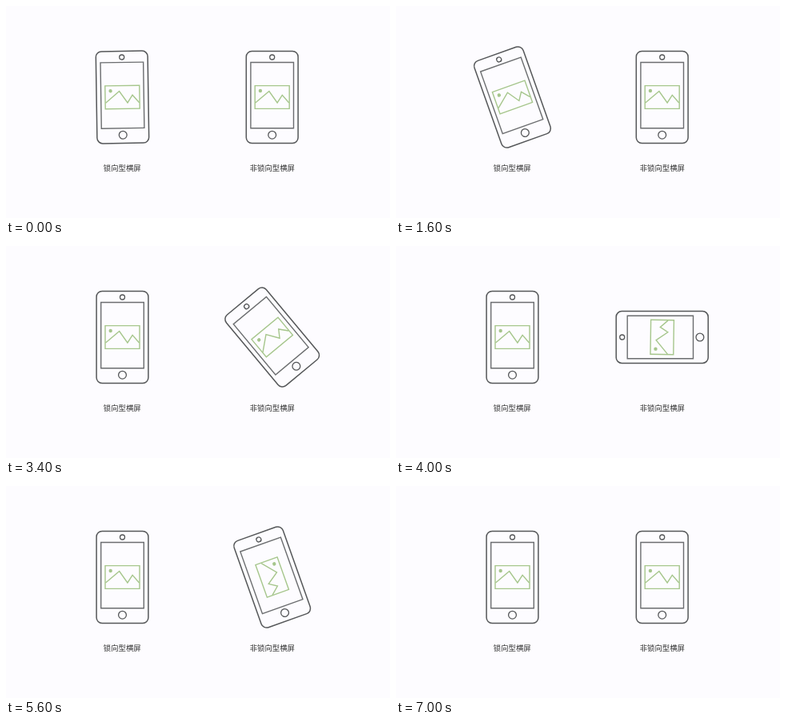
An HTML page with a canvas that plays this animation: 480 by 265 pixels, repeating every 8200 ms.

```html
<!DOCTYPE html>
<html lang="zh-CN">
<head>
<meta charset="utf-8">
<title>横屏</title>
<style>
  html, body { margin: 0; width: 100%; height: 100%; overflow: hidden; background: #fdfcff; }
  canvas { display: block; width: 480px; height: 265px; }
  .label {
    position: absolute; top: 192px; width: 120px;
    font: 9.4px/20px "Noto Sans CJK SC", "Noto Sans CJK", sans-serif;
    color: #333; text-align: center; white-space: nowrap;
  }
</style>
</head>
<body>
<canvas id="stage"></canvas>
<div class="label" style="left:85.3px">锁向型横屏</div>
<div class="label" style="left:272.8px">非锁向型横屏</div>
<script>
const LOOP = 8200, STEP = 200, TURN = 1000, LEAD = 70;
const DARK = '#555759', GREY = '#6b6d6f', GREEN = '#a6c68c';
const PEAKS = [[-21, 7], [-3.8, -7.5], [6.4, 7], [12.6, -2.6], [21, 7]];

const canvas = document.getElementById('stage');
const ctx = canvas.getContext('2d');
const dpr = window.devicePixelRatio || 1;
canvas.width = 480 * dpr;
canvas.height = 265 * dpr;

// Quadratic ease-in-out of one turn beginning at `start`
function turn(t, start) {
  const u = Math.min(1, Math.max(0, (t - start) / TURN));
  return u < 0.5 ? 2 * u * u : 1 - 2 * (1 - u) * (1 - u);
}

// Turns from 0 to 1 at `out`, back to 0 at `back`
const swing = (t, out, back) => turn(t, out) - turn(t, back);

function strokePath(color, width, build) {
  ctx.strokeStyle = color;
  ctx.lineWidth = width;
  ctx.beginPath();
  build();
  ctx.stroke();
}

function ring(y, r) {
  strokePath(DARK, 1.3, () => ctx.arc(0, y, r, 0, Math.PI * 2));
}

function drawPicture() {
  strokePath(GREEN, 1.4, () => ctx.rect(-21.5, -14.4, 43, 28.8));
  strokePath(GREEN, 1.4, () => PEAKS.forEach(([x, y]) => ctx.lineTo(x, y)));
  ctx.fillStyle = GREEN;
  ctx.beginPath();
  ctx.arc(-14.8, -8, 2.2, 0, Math.PI * 2);
  ctx.fill();
}

function drawPhone(x, tilt, pictureTilt) {
  ctx.save();
  ctx.translate(x, 114);
  ctx.rotate(tilt);
  strokePath(DARK, 1.5, () => ctx.roundRect(-32.4, -57.5, 64.8, 115, 7));
  strokePath(GREY, 1.4, () => ctx.rect(-26.8, -43.5, 53.6, 82.3));
  ring(-50, 3);
  ring(47.2, 4.9);
  ctx.rotate(pictureTilt);
  drawPicture();
  ctx.restore();
}

function frame(now) {
  // The picture advances in steps of 200 ms
  const t = Math.floor((now % LOOP) / STEP) * STEP + LEAD;
  const quarter = Math.PI / 2;
  ctx.setTransform(dpr, 0, 0, dpr, 0, 0);
  ctx.fillStyle = '#fdfcff';
  ctx.fillRect(0, 0, 480, 265);
  drawPhone(145.5, -quarter * swing(t, 0, 1000), 0);
  drawPhone(332.7, -quarter * swing(t, 3000, 5000), quarter * swing(t, 4000, 6000));
  requestAnimationFrame(frame);
}
requestAnimationFrame(frame);
</script>
</body>
</html>
```
